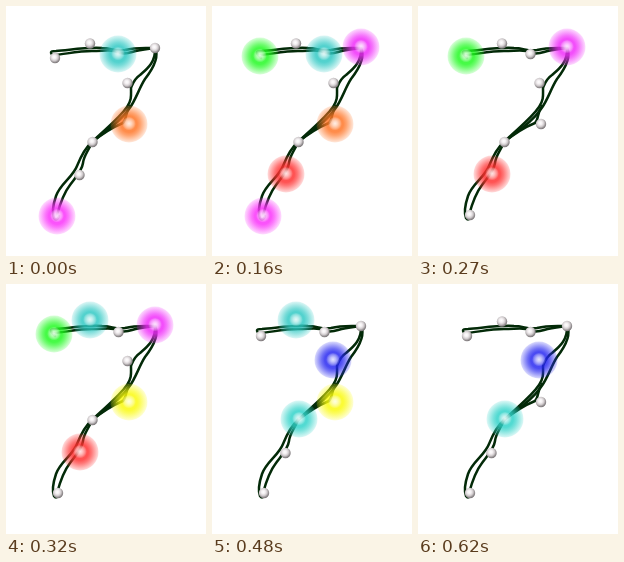
An HTML page with a canvas for the animation above (680 ms loop, 200x250 px).

```html
<!DOCTYPE html>
<html>
<head>
<meta charset="utf-8">
<style>
html, body { margin: 0; width: 100%; height: 100%; overflow: hidden; background: #fff; }
canvas { display: block; width: 200px; height: 250px; }
</style>
</head>
<body>
<canvas id="stage" width="200" height="250"></canvas>
<script>
const ctx = document.getElementById('stage').getContext('2d');
const LOOP = 680;

// Each bulb: place, glow centre, then lit spans as [from, to, rgb]
const bulbs = [
  { x: 49, y: 52, gx: 48, gy: 50, lit: [[160, 360, '30,250,30']] },
  { x: 84, y: 37.5, gx: 84, gy: 36, lit: [[320, 520, '45,200,195']] },
  { x: 112.5, y: 48, gx: 112, gy: 48, lit: [[0, 200, '45,200,195']] },
  { x: 149, y: 42, gx: 149, gy: 41, lit: [[160, 360, '240,40,250']] },
  { x: 121.5, y: 77, gx: 121, gy: 76, lit: [[480, 680, '35,35,240']] },
  { x: 123, y: 118, gx: 123, gy: 118, lit: [[0, 200, '255,115,35'], [320, 520, '250,250,10']] },
  { x: 86.5, y: 136, gx: 87, gy: 135, lit: [[480, 680, '45,210,200']] },
  { x: 73.5, y: 169, gx: 74, gy: 168, lit: [[160, 360, '255,45,45']] },
  { x: 52, y: 209, gx: 51, gy: 210, lit: [[0, 200, '250,45,250']] }
];

// Two strands twisted around each other, in three stretches
const wires = [
  'M49 52 C43 46 44 45 50 45 C64 44 80 41 96 42 C106 42 110 46 119 44 C130 41 140 42 149 42',
  'M49 49 C60 48 72 45 86 45 C96 45 103 44 108 45 C114 48 120 48 126 46 C135 43 142 43 149 42',
  'M149 42 C154 52 146 64 139 73 C133 82 130 94 123 103 C114 116 101 124 86 136',
  'M149 42 C150 56 141 63 134 69 C128 73 127 77 125 82 C125 89 126 94 121 101 C113 113 98 124 86 136',
  'M124 100 C119 107 121 113 117 117 C107 121 96 128 86 136',
  'M86 136 C79 142 75 150 71 160 C67 171 54 178 50 190 C47 199 46 207 48 212 C50 215 52 213 53 210',
  'M86 136 C82 146 78 149 77 157 C76 165 69 172 64 179 C57 188 54 198 51 209'
].map(d => new Path2D(d));

function disc(x, y, r, fill) {
  ctx.fillStyle = fill;
  ctx.beginPath();
  ctx.arc(x, y, r, 0, Math.PI * 2);
  ctx.fill();
}

function radial(x, y, r, stops) {
  const g = ctx.createRadialGradient(x, y, 0, x, y, r);
  stops.forEach(([at, color]) => g.addColorStop(at, color));
  return g;
}

function drawWires() {
  ctx.strokeStyle = '#032a08';
  ctx.lineWidth = 2.5;
  ctx.lineCap = ctx.lineJoin = 'round';
  wires.forEach(w => ctx.stroke(w));
}

function drawBulb(x, y) {
  disc(x, y, 5.2, radial(x - 0.7, y - 1, 6.5, [
    [0, '#fff'], [0.3, '#f3eff1'], [0.58, '#d0cbcd'], [0.8, '#999496'], [1, '#706b6d']
  ]));
}

function drawGlow(x, y, rgb) {
  const c = a => `rgba(${rgb},${a})`;
  disc(x, y, 18.5, radial(x, y, 18.5, [
    [0, c(0.82)], [0.45, c(0.82)], [0.62, c(0.65)], [0.8, c(0.42)], [1, c(0.16)]
  ]));
  disc(x, y, 7, radial(x, y - 0.5, 7, [
    [0, 'rgba(255,255,255,.85)'], [0.35, 'rgba(255,255,255,.65)'],
    [0.7, 'rgba(255,255,255,.35)'], [1, 'rgba(255,255,255,0)']
  ]));
}

function draw(t) {
  ctx.fillStyle = '#fff';
  ctx.fillRect(0, 0, 200, 250);
  drawWires();
  for (const b of bulbs) {
    const on = b.lit.find(([from, to]) => t >= from && t < to);
    if (on) drawGlow(b.gx, b.gy, on[2]);
    else drawBulb(b.x, b.y);
  }
}

const start = performance.now();
function tick() {
  draw((performance.now() - start) % LOOP);
  requestAnimationFrame(tick);
}
tick();
</script>
</body>
</html>
```
